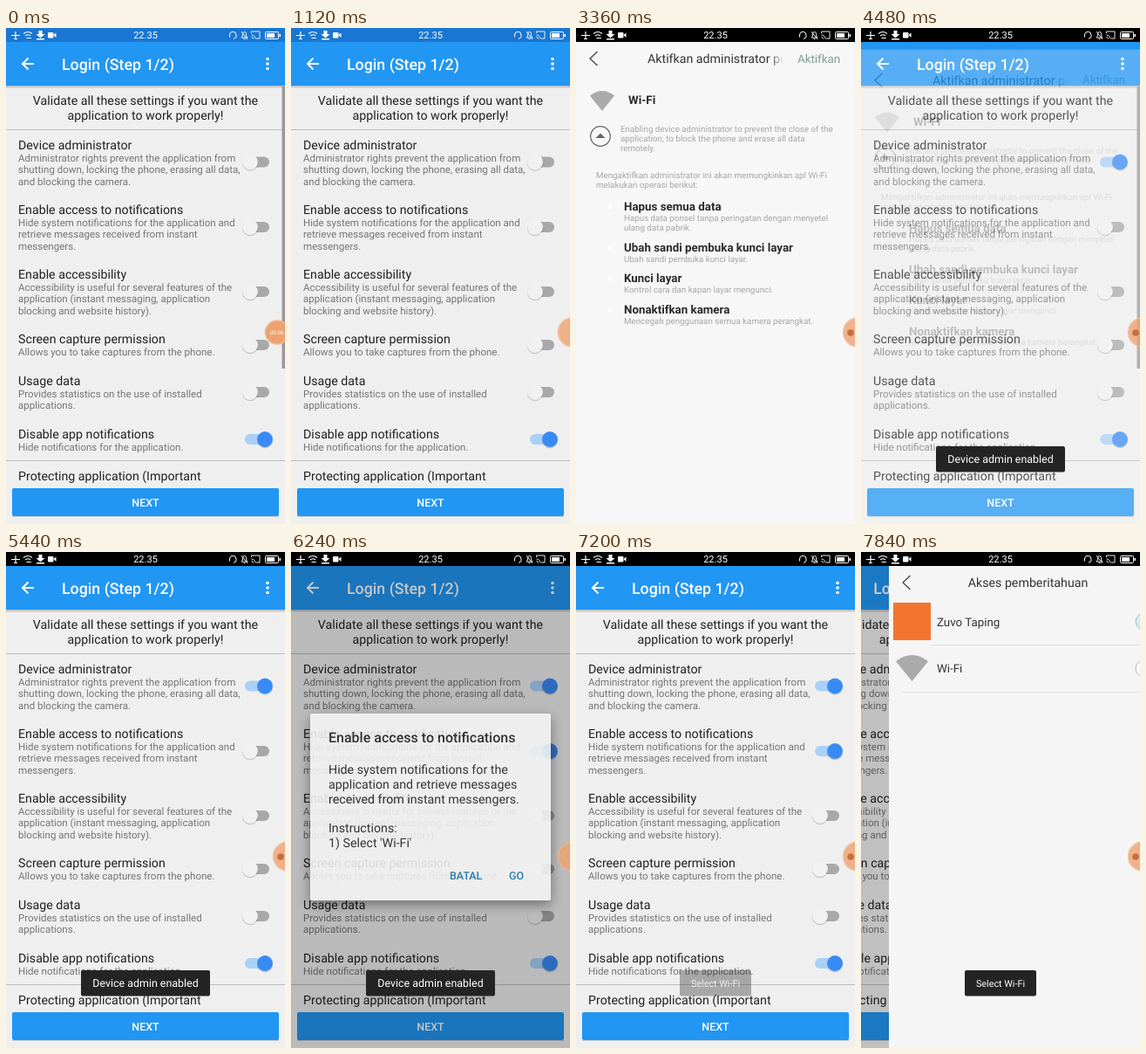
An HTML page for the animation above (8 s loop, 320x568 px).

```html
<!DOCTYPE html>
<html lang="en">
<head>
<meta charset="utf-8">
<title>Settings walkthrough</title>
<style>
  html, body { margin: 0; width: 100%; height: 100%; overflow: hidden; background: #efefef; }
  svg { display: block; width: 320px; height: 568px; font-family: Roboto, sans-serif; }
  text { white-space: pre; text-rendering: geometricPrecision; }
  .raised { filter: drop-shadow(0 5px 7px rgba(0, 0, 0, .45)); }
</style>
</head>
<body>
<svg id="stage" viewBox="0 0 320 568"></svg>
<script>
const LOOP = 8000, STEP = 160;
const DP = 320 / 360;
const BLUE = '#2196f3';

// Markup helpers; text sizes are given in sp.
const text = (x, y, sp, fill, str, extra = '') =>
  `<text x="${x}" y="${y}" font-size="${sp * DP}" fill="${fill}" ${extra}>${str}</text>`;
const lines = (x, y, pitch, sp, fill, rows, extra) =>
  rows.map((row, i) => text(x, y + i * pitch, sp, fill, row, extra)).join('');
const rect = (x, y, w, h, fill, extra = '') =>
  `<rect x="${x}" y="${y}" width="${w}" height="${h}" fill="${fill}" ${extra}/>`;
const circle = (x, y, r, fill, extra = '') =>
  `<circle cx="${x}" cy="${y}" r="${r}" fill="${fill}" ${extra}/>`;
const stroke = (d, color, width = 1) =>
  `<path d="${d}" fill="none" stroke="${color}" stroke-width="${width}"/>`;
const group = (id, body) => `<g id="${id}">${body}</g>`;
const fan = (x, y, w, h) =>
  `<path d="M${x} ${y + h * .24}Q${x + w / 2} ${y - h * .24} ${x + w} ${y + h * .24}L${x + w / 2} ${y + h}Z" fill="#aaa"/>`;
const MIDDLE = 'text-anchor="middle"', MEDIUM = 'font-weight="500"', BOLD = 'font-weight="700"';

const settings = [
  { id: 'admin', y: 139, knobY: 153.5, title: 'Device administrator', info: [
    'Administrator rights prevent the application from',
    'shutting down, locking the phone, erasing all data,', 'and blocking the camera.'] },
  { id: 'notify', y: 213, knobY: 228, title: 'Enable access to notifications', info: [
    'Hide system notifications for the application and',
    'retrieve messages received from instant', 'messengers.'] },
  { id: 'access', y: 287, knobY: 302, title: 'Enable accessibility', info: [
    'Accessibility is useful for several features of the',
    'application (instant messaging, application', 'blocking and website history).'] },
  { id: 'capture', y: 361.4, knobY: 363, title: 'Screen capture permission',
    info: ['Allows you to take captures from the phone.'] },
  { id: 'usage', y: 409, knobY: 417, title: 'Usage data',
    info: ['Provides statistics on the use of installed', 'applications.'] },
  { id: 'mute', y: 470, knobY: 471, title: 'Disable app notifications',
    info: ['Hide notifications for the application.'] },
];

const toggle = (id, y) =>
  `<g id="${id}">${rect(274, y - 6, 28, 12, '#a8a8a8', 'rx="6" class="track"')}` +
  circle(280, y + 1, 9.2, '#000', 'opacity=".16" class="knob"') +
  circle(280, y, 8.9, '#f1f1f1', 'class="knob face"') + '</g>';

const loginPage = () =>
  rect(0, 0, 420, 568, '#efefef') + rect(0, 0, 420, 16, '#1976d2') +
  rect(0, 66, 420, 3, '#000', 'opacity=".08"') + rect(0, 66, 420, 1.5, '#000', 'opacity=".14"') +
  rect(0, 16, 420, 50, BLUE) +
  stroke('M32 41H19.500M25.500 34.500L19 41L25.500 47.500', '#fff', 2) +
  text(64, 48, 20, '#fff', 'Login (Step 1/2)', MEDIUM) +
  [35.5, 41, 46.5].map(y => circle(300, y, 1.8, '#fff')).join('') +
  lines(160, 88, 17, 16, '#212121',
    ['Validate all these settings if you want the', 'application to work properly!'], MIDDLE) +
  rect(0, 116, 420, 1, '#bdbdbd') + rect(0, 495, 420, 1, '#bdbdbd') +
  settings.map(s => text(14, s.y, 16, '#212121', s.title) +
    lines(14, s.y + 14, 13.4, 13, '#757575', s.info) + toggle(s.id, s.knobY)).join('') +
  text(14, 518, 16, '#212121', 'Protecting application (Important') +
  rect(7, 559, 306, 1, '#000', 'opacity=".15"') + rect(7, 527, 306, 32, BLUE, 'rx="2"') +
  text(160, 548, 14, '#fff', 'NEXT', MIDDLE + ' ' + MEDIUM) +
  rect(316.5, 67, 3.5, 323, '#999', 'id="scrollbar"');

const chevron = stroke('M24.500 27L16 35L24.500 43', '#444', 1.3);

const operations = [
  [209, 'Hapus semua data', ['Hapus data ponsel tanpa peringatan dengan menyetel', 'ulang data pabrik.']],
  [256, 'Ubah sandi pembuka kunci layar', ['Ubah sandi pembuka kunci layar.']],
  [291, 'Kunci layar', ['Kontrol cara dan kapan layar mengunci.']],
  [327, 'Nonaktifkan kamera', ['Mencegah penggunaan semua kamera perangkat.']],
];

const adminPage = () => rect(0, 0, 320, 568, '#f7f7f7') + group('adminBody',
  chevron + text(82, 40, 16, 'url(#fade)', 'Aktifkan administrator perangkat') +
  text(254, 39.5, 15, '#7f9d92', 'Aktifkan') +
  fan(16, 72, 28, 23) + text(60, 87, 15, '#2b2b2b', 'Wi-Fi', BOLD) +
  circle(28, 124, 11.3, 'none', 'stroke="#666" stroke-width="1.200"') +
  '<path d="M22.500 126L28 120.500L33.500 126Z" fill="#666"/>' +
  lines(51, 119, 11, 11, '#a6a6a6', ['Enabling device administrator to prevent the close of the',
    'application, to block the phone and erase all data', 'remotely.']) +
  lines(23, 172, 11, 11, '#a6a6a6', ['Mengaktifkan administrator ini akan memungkinkan apl Wi-Fi',
    'melakukan operasi berikut:']) +
  operations.map(([y, title, info]) => circle(39, y - 4, 2.5, '#fff') +
    text(55, y, 15, '#2b2b2b', title, BOLD) + lines(55, y + 11.5, 11, 11, '#a6a6a6', info)).join(''));

const accessPage = () => rect(0, 0, 320, 568, '#f5f5f5') + chevron +
  text(159.5, 40, 16, '#333', 'Akses pemberitahuan', MIDDLE) +
  rect(5, 58, 43, 43, '#f4742f') + text(55, 85, 15, '#333', 'Zuvo Taping') +
  fan(8, 118, 37, 30) + text(55, 138, 15, '#333', 'Wi-Fi') +
  rect(48, 106, 272, 1, '#dedede') + rect(16, 160, 304, 1, '#dedede') +
  rect(283, 70, 30, 19, '#d5ebef', 'rx="9.500" stroke="#9cc3cb"') +
  rect(283, 124, 30, 19, '#fff', 'rx="9.500" stroke="#b5b5b5"');

const dialog = () => rect(22, 185, 276, 214, '#f7f7f7', 'rx="2" class="raised"') +
  text(43, 218, 18, '#212121', 'Enable access to notifications', MEDIUM) +
  lines(43, 254.4, 16.7, 16, '#212121', ['Hide system notifications for the',
    'application and retrieve messages', 'received from instant messengers.', '',
    'Instructions:', "1) Select 'Wi-Fi'"]) +
  text(182, 375.4, 14, '#1577ad', 'BATAL', MEDIUM) + text(250, 375.4, 14, '#1577ad', 'GO', MEDIUM);

const toast = (id, width, sp, message) => group(id,
  rect(160 - width / 2, 479, width, 29.5, '#242424', 'rx="2"') +
  text(160, 498.4, sp, '#fff', message, MIDDLE));

const statusIcons = () =>
  stroke('M6 8.500H16M11 4V13M9 12.500H13', '#fff', 1.2) +
  stroke('M20 6.500Q25 2.500 30 6.500M22 9Q25 6.500 28 9M23.500 11.500H29', '#fff', 1.1) +
  '<path d="M37.500 3H41.500V7H44.500L39.500 11.500L34.500 7H37.500ZM35 12H44V13.500H35Z" fill="#fff"/>' +
  rect(48, 5, 6.5, 6.5, '#fff', 'rx="1"') + '<path d="M54.500 8L57.500 5.500V11Z" fill="#fff"/>' +
  text(160, 12, 12.4, '#fff', '22.35', MIDDLE) +
  stroke('M256.500 10.500V8A3.700 3.700 0 0 1 264 8V10.500L261 12.500', '#fff') +
  stroke('M270 11H277L275.500 9V6.500A2 2 0 0 0 271.500 6.500V9ZM272.500 12.500H274.500M270 4L277 13', '#fff', .9) +
  stroke('M281.500 6V4H291V12H287M281.500 8A4.500 4.500 0 0 1 286 12.500M281.500 10.500A2 2 0 0 1 283.500 12.500', '#fff', .9) +
  rect(297.5, 4.5, 15, 8, 'none', 'stroke="#fff" rx="1"') + rect(299, 6, 9, 5, '#fff') + rect(313.5, 7, 1.5, 3, '#fff');

document.getElementById('stage').innerHTML =
  `<defs><linearGradient id="fade" gradientUnits="userSpaceOnUse" x1="222" x2="238" y1="0" y2="0">
     <stop stop-color="#333"/><stop offset="1" stop-color="#333" stop-opacity="0"/></linearGradient></defs>` +
  group('login', loginPage()) + rect(0, 0, 320, 568, '#000', 'id="dim"') +
  group('adminPage', adminPage()) + group('accessPage', accessPage()) + group('dialog', dialog()) +
  rect(0, 0, 320, 16, '#000', 'id="blackBar"') + statusIcons() +
  toast('adminToast', 148, 14, 'Device admin enabled') + toast('selectToast', 82, 12.15, 'Select Wi-Fi') +
  group('bubble', circle(0, 348.5, 1, '#eea270', 'id="disc" stroke="#f0b78e" stroke-width="1.500"') +
    text(310.5, 350.5, 7, '#fff', '00:06', MIDDLE + ' id="timer"') + circle(315, 349, 3.8, '#c46f42', 'id="dot"'));

const $ = id => document.getElementById(id);
const progress = (t, start, length) => Math.min(1, Math.max(0, (t - start) / length));
const easeOut = p => 1 - (1 - p) ** 3;
const fade = (id, value) => $(id).setAttribute('opacity', value);
const move = (id, x, y = 0) => $(id).setAttribute('transform', `translate(${x} ${y})`);
const blend = (a, b, p) => `rgb(${a.map((v, i) => Math.round(v + (b[i] - v) * p))})`;

function setToggle(id, p) {
  const node = $(id);
  node.querySelectorAll('.knob').forEach(k => k.setAttribute('cx', 280 + 17 * p));
  node.querySelector('.face').setAttribute('fill', blend([241, 241, 241], [56, 139, 245], p));
  node.querySelector('.track').setAttribute('fill', blend([168, 168, 168], [170, 208, 248], p));
}

function draw(t) {
  const adminIn = easeOut(progress(t, 1833, 400));
  const adminOut = progress(t, 4300, 240);
  const accessIn = easeOut(progress(t, 7626, 400));
  const slide = t < 4300 ? adminIn : accessIn;
  const dialogOut = progress(t, 6850, 180);
  const scrim = .52 * progress(t, 6110, 300) * (1 - dialogOut);

  move('login', -73 * slide ** 3.6);
  fade('scrollbar', 1 - progress(t, t < 4300 ? 300 : 4800, 300));
  fade('dim', Math.max(scrim, .27 * slide ** 3));
  setToggle('admin', progress(t, 1600, 150));
  setToggle('notify', progress(t, 5900, 150));
  setToggle('mute', 1);

  move('adminPage', 320 * (1 - adminIn), 33 * adminOut);
  fade('adminPage', 1 - adminOut);
  fade('adminBody', t >= 2400 ? 1 : 0);
  fade('blackBar', t >= 2400 ? 1 : 0);
  move('accessPage', Math.round(320 * (1 - accessIn)));
  fade('dialog', progress(t, 6110, 150) * (1 - dialogOut));

  fade('adminToast', progress(t, 4300, 160) * (1 - progress(t, 6400, 250)));
  fade('selectToast', progress(t, 7130, 200));

  const tuck = easeOut(progress(t, 900, 300));
  $('disc').setAttribute('cx', 311 + 12 * tuck);
  $('disc').setAttribute('r', 13.5 + 3 * tuck);
  fade('disc', 1 - .2 * tuck);
  fade('timer', 1 - tuck);
  fade('dot', t > 1200 && (t + 100) % 2000 > 500 ? 1 : 0);
}

function tick(now) {
  draw(Math.floor(now % LOOP / STEP) * STEP);
  requestAnimationFrame(tick);
}
draw(0);
requestAnimationFrame(tick);
</script>
</body>
</html>
```
